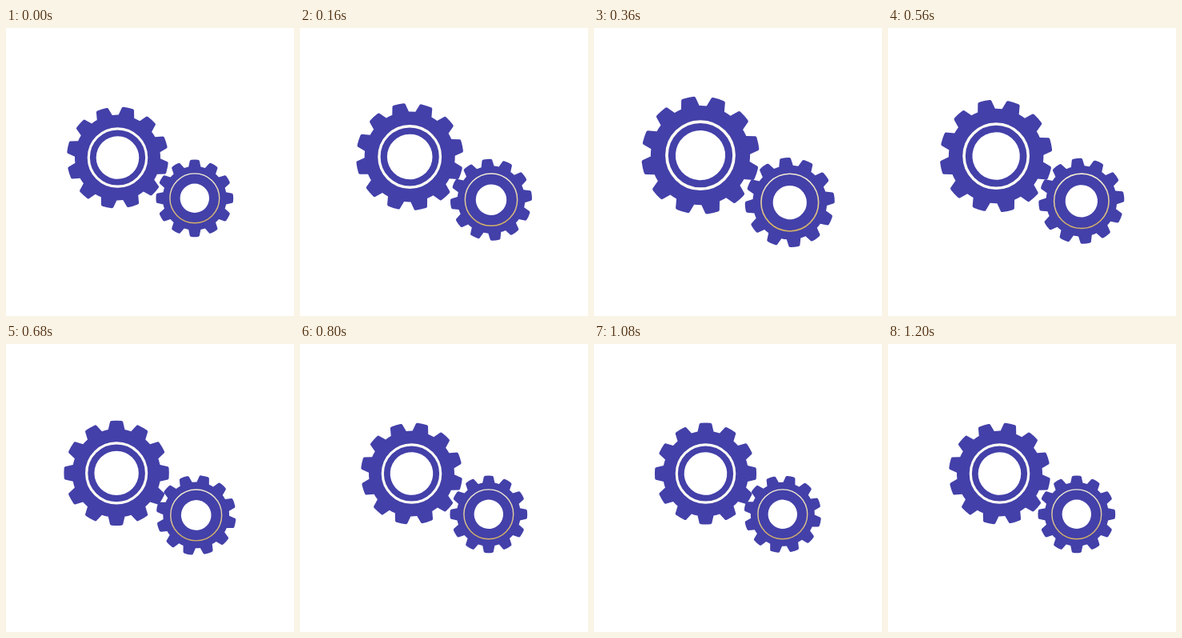
Write an HTML page that moves like this. It is 360 px wide and 360 px high and loops after 1.4 s.

```html
<!DOCTYPE html>
<html lang="en">
<head>
<meta charset="utf-8">
<title>Turning gears</title>
<style>
  html, body { margin: 0; width: 100%; height: 100%; overflow: hidden; background: #fff; }
  svg { display: block; width: 100vw; height: 100vh; }
</style>
</head>
<body>
<svg viewBox="0 0 360 360">
  <defs>
    <linearGradient id="gold" x1="0" y1="0" x2="0" y2="1">
      <stop offset="0.1" stop-color="#f3ecd2"/>
      <stop offset="0.9" stop-color="#d3b068"/>
    </linearGradient>
  </defs>
  <g id="stage" fill="#4340a9"></g>
</svg>
<script>
const TICK = 40, LOOP = 1400, LAST = 30, PULSE = 20, TURN = 6, GROW = 0.165;
const TEETH = 12;
const stage = document.getElementById('stage');

const gears = [
  { x: 139.5, y: 162, tip: 63.6, root: 53.5, tipHalf: 7.4, rootHalf: 10, hole: 26.8,
    ring: 36.2, line: 3.2, tint: '#fffdf6', phase: 12, dir: -1 },
  { x: 235.8, y: 212.8, tip: 48.4, root: 40, tipHalf: 5.6, rootHalf: 7.6, hole: 18.2,
    ring: 30.9, line: 1.4, tint: 'url(#gold)', phase: 0, dir: 1 }
];

function add(parent, tag, attrs) {
  const el = document.createElementNS('http://www.w3.org/2000/svg', tag);
  for (const key in attrs) el.setAttribute(key, attrs[key]);
  return parent.appendChild(el);
}

const circle = r => `M${-r} 0a${r} ${r} 0 1 0 ${2 * r} 0a${r} ${r} 0 1 0 ${-2 * r} 0z`;

// Outline of one gear; the top corners of each tooth are rounded.
function outline({ tip, root, tipHalf, rootHalf }) {
  const base = Math.sqrt(root * root - rootHalf * rootHalf), c = 1.5;
  let d = '';
  for (let i = 0; i < TEETH; i++) {
    const a = i * 2 * Math.PI / TEETH, cos = Math.cos(a), sin = Math.sin(a);
    const at = (x, r) => `${(x * cos + r * sin).toFixed(2)} ${(x * sin - r * cos).toFixed(2)}`;
    d += `${i ? `A${root} ${root} 0 0 1 ` : 'M'}${at(-rootHalf, base)}`
       + `L${at(-tipHalf - 0.4, tip - c)}Q${at(-tipHalf, tip - 0.5)} ${at(-tipHalf + c, tip - 0.3)}`
       + `Q${at(0, tip + 0.2)} ${at(tipHalf - c, tip - 0.3)}`
       + `Q${at(tipHalf, tip - 0.5)} ${at(tipHalf + 0.4, tip - c)}L${at(rootHalf, base)}`;
  }
  return `${d}A${root} ${root} 0 0 1 ${-rootHalf} ${-base}z`;
}

for (const g of gears) {
  const box = add(stage, 'g', { transform: `translate(${g.x} ${g.y})` });
  g.wheel = add(box, 'path', { d: outline(g) + circle(g.hole), 'fill-rule': 'evenodd' });
  add(box, 'circle', { r: g.ring, fill: 'none', stroke: g.tint, 'stroke-width': g.line });
}

function draw(ms) {
  const n = Math.min(LAST, Math.floor((ms % LOOP) / TICK));
  const swell = n < PULSE ? (1 - Math.cos(2 * Math.PI * n / PULSE)) / 2 : 0;
  const scale = 1 + GROW * swell;
  stage.setAttribute('transform', `translate(180 180) scale(${scale}) translate(-180 -180)`);
  for (const g of gears) g.wheel.setAttribute('transform', `rotate(${g.phase + g.dir * TURN * n})`);
}

const start = performance.now();
function frame() {
  draw(performance.now() - start);
  requestAnimationFrame(frame);
}
draw(0);
requestAnimationFrame(frame);
</script>
</body>
</html>
```
